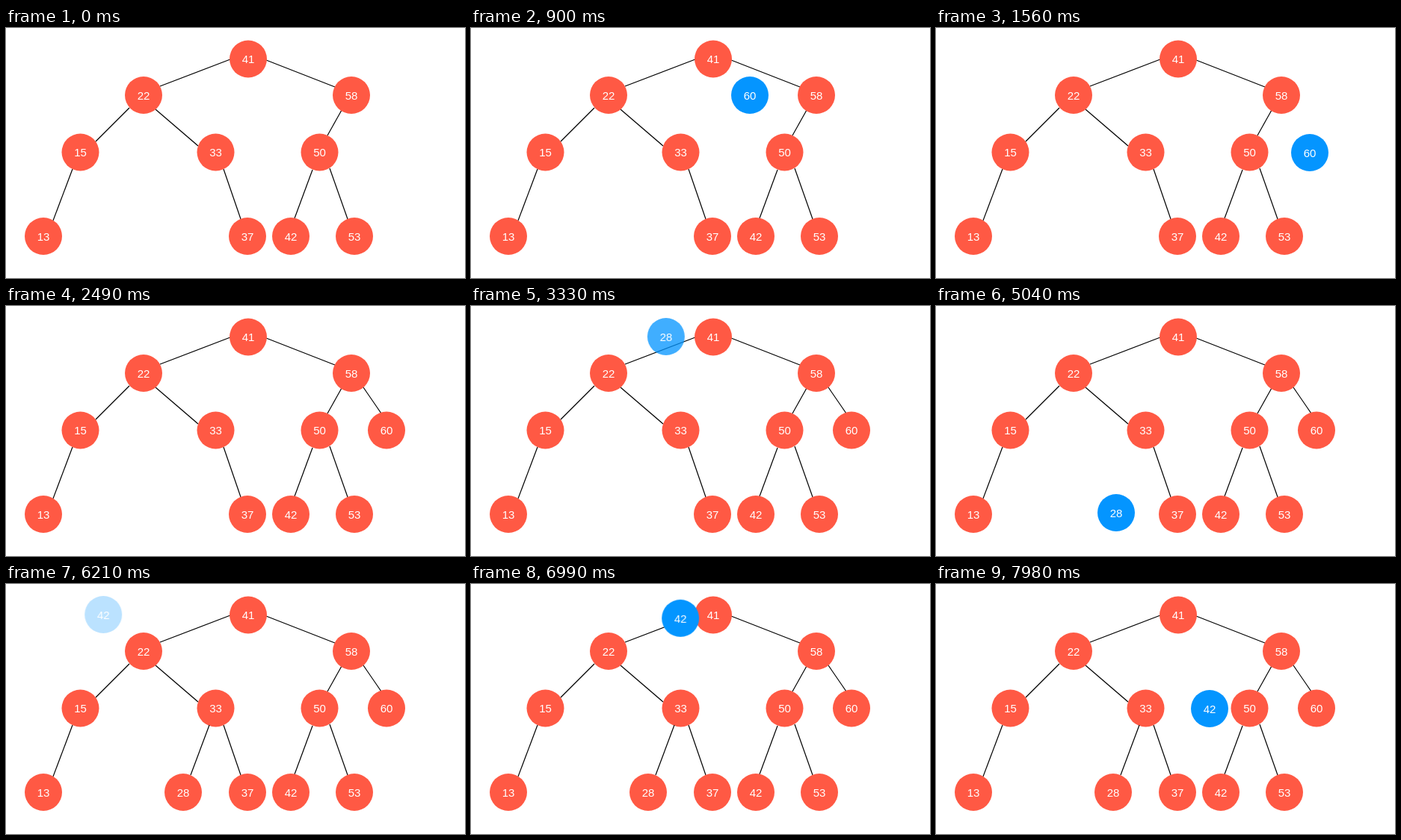
These frames come from a looping animation (614x335 px, 8 s). An HTML page:

```html
<!DOCTYPE html>
<html lang="en">
<head>
<meta charset="utf-8">
<title>Binary search tree insertion</title>
<style>
html, body { margin: 0; width: 100%; height: 100%; overflow: hidden; background: #fff; }
svg { display: block; width: 614px; height: 335px; }
line { stroke: #000; stroke-width: 1.2; }
circle { fill: #ff5944; }
text { fill: #fff; font: 15px "Liberation Sans", Arial, sans-serif; text-anchor: middle; }
.key circle { fill: #0495ff; }

.key, .added { opacity: 0; animation: 8s linear infinite; }
#key60 { animation-name: path60, show60; }
#key28 { animation-name: path28, show28; }
#key42 { animation-name: path42, show42; }
#added60 { animation-name: add60; }
#added28 { animation-name: add28; }

/* Slide in from the left, then step down beside each compared node. */
.key {
  --enter: cubic-bezier(.333, .667, .667, 1);
  --step: ease-in-out;
}
@keyframes path60 {
  0% { transform: translate(13px, 41px); animation-timing-function: var(--enter); }
  5.75%, 6% { transform: translate(270px, 41px); animation-timing-function: var(--step); }
  11%, 12.875% { transform: translate(373px, 90px); animation-timing-function: var(--step); }
  17.875%, 100% { transform: translate(500px, 167px); }
}
@keyframes path28 {
  0%, 36.875% { transform: translate(13px, 41px); animation-timing-function: var(--enter); }
  43.125%, 46.125% { transform: translate(270px, 41px); animation-timing-function: var(--step); }
  51.125%, 52% { transform: translate(282px, 92px); animation-timing-function: var(--step); }
  57%, 57.8125% { transform: translate(227px, 167px); animation-timing-function: var(--step); }
  62.8125%, 100% { transform: translate(241px, 277px); }
}
@keyframes path42 {
  0%, 75.9375% { transform: translate(13px, 41px); animation-timing-function: var(--enter); }
  82.1875%, 86.875% { transform: translate(270px, 41px); animation-timing-function: var(--step); }
  91.875%, 93.75% { transform: translate(373px, 90px); animation-timing-function: var(--step); }
  98.75%, 100% { transform: translate(366px, 167px); }
}

@keyframes show60 {
  0% { opacity: 0; }
  5.75%, 23.75% { opacity: 1; }
  27.5%, 100% { opacity: 0; }
}
@keyframes show28 {
  0%, 36.875% { opacity: 0; }
  43.125%, 67.5% { opacity: 1; }
  71.25%, 100% { opacity: 0; }
}
@keyframes show42 {
  0%, 75.9375% { opacity: 0; }
  82.1875%, 100% { opacity: 1; }
}
@keyframes add60 {
  0%, 23.75% { opacity: 0; }
  27.5%, 100% { opacity: 1; }
}
@keyframes add28 {
  0%, 67.5% { opacity: 0; }
  71.25%, 100% { opacity: 1; }
}
</style>
</head>
<body>
<svg id="stage" viewBox="0 0 614 335"></svg>
<script>
const stage = document.getElementById("stage");

function add(parent, tag, attrs = {}) {
  const el = document.createElementNS("http://www.w3.org/2000/svg", tag);
  for (const name in attrs) el.setAttribute(name, attrs[name]);
  return parent.appendChild(el);
}

function edge(parent, x1, y1, x2, y2) {
  add(parent, "line", { x1, y1, x2, y2 });
}

function node(parent, label, x = 0, y = 0) {
  add(parent, "circle", { cx: x, cy: y, r: 25 });
  add(parent, "text", { x, y: y + 5.5 }).textContent = label;
}

const edges = [
  [300, 42, 206, 78], [348, 43, 440, 79],
  [165, 107, 120, 152], [200, 109, 257, 158], [449, 110, 430, 144],
  [89, 189, 63, 258], [291, 189, 314, 256],
  [410, 190, 386, 255], [433, 188, 457, 256]
];
const nodes = [
  [41, 324, 41.5], [22, 184, 90], [58, 462, 90],
  [15, 99.5, 166.5], [33, 280.5, 166.5], [50, 419.5, 166.5],
  [13, 50, 279], [37, 323, 279], [42, 381, 279], [53, 466, 279]
];
edges.forEach(e => edge(stage, ...e));
nodes.forEach(n => node(stage, ...n));

function addedNode(label, x, y, line) {
  const group = add(stage, "g", { id: "added" + label, class: "added" });
  edge(group, ...line);
  node(group, label, x, y);
}
addedNode(60, 509, 166.5, [478, 109, 502, 144]);
addedNode(28, 237, 279, [272, 189, 247, 256]);

for (const label of [60, 28, 42]) {
  node(add(stage, "g", { id: "key" + label, class: "key" }), label);
}
</script>
</body>
</html>
```
